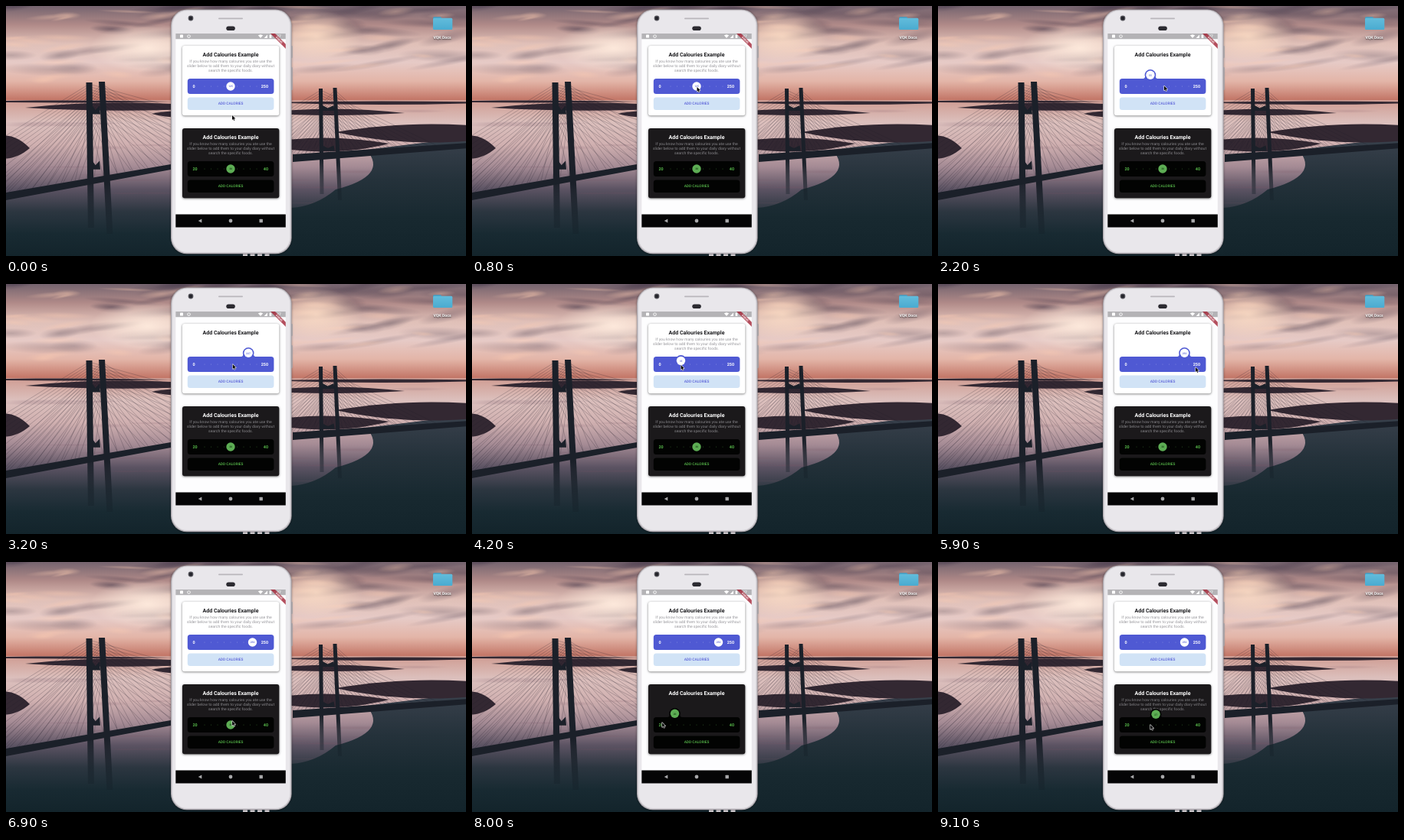
Write an HTML page with a canvas that moves like this. It is 600 px wide and 327 px high and loops after 9200 ms.

```html
<!DOCTYPE html>
<html lang="en">
<head>
<meta charset="utf-8">
<title>Fluid slider demo</title>
<style>
html, body { margin: 0; width: 100%; height: 100%; overflow: hidden; background: #1a2033; }
canvas { display: block; width: 600px; height: 327px; }
</style>
</head>
<body>
<canvas id="stage"></canvas>
<script>
const W = 600, H = 327, LOOP = 9200, STEP = 100, HORIZON = 123;
const ratio = window.devicePixelRatio || 1;

function setup(canvas) {
  canvas.width = W * ratio;
  canvas.height = H * ratio;
  const c = canvas.getContext('2d');
  c.scale(ratio, ratio);
  c.textRendering = 'geometricPrecision';
  return c;
}

const stage = setup(document.getElementById('stage'));
const backdrop = document.createElement('canvas');
let g = setup(backdrop);

// ---- helpers ----
const clamp = (v, lo, hi) => Math.min(hi, Math.max(lo, v));
const ease = u => (u = clamp(u, 0, 1), u * u * (3 - 2 * u));

let seed = 11;
function rnd(lo, hi) {
  seed = (seed * 16807) % 2147483647;
  return lo + (hi - lo) * seed / 2147483647;
}

function box(x, y, w, h, r, fill) {
  g.beginPath();
  g.roundRect(x, y, w, h, r);
  g.fillStyle = fill;
  g.fill();
}
function disc(x, y, r, fill) {
  g.beginPath();
  g.arc(x, y, r, 0, Math.PI * 2);
  g.fillStyle = fill;
  g.fill();
}
function poly(fill, ...p) {
  g.beginPath();
  for (let i = 0; i < p.length; i += 2) g.lineTo(p[i], p[i + 1]);
  g.closePath();
  g.fillStyle = fill;
  g.fill();
}
function text(s, x, y, size, fill, weight = 400, align = 'center') {
  g.font = `${weight} ${size}px Roboto, sans-serif`;
  g.textAlign = align;
  g.fillStyle = fill;
  g.fillText(s, x, y + size * 0.355);
}
function shade(y0, y1, ...stops) {
  const grad = g.createLinearGradient(0, y0, 0, y1);
  stops.forEach((s, i) => grad.addColorStop(i / (stops.length - 1), s));
  return grad;
}
function glow(x, y, rx, ry, rgb, alpha, tilt = 0) {
  g.save();
  g.translate(x, y);
  g.rotate(tilt);
  g.scale(rx, ry);
  const grad = g.createRadialGradient(0, 0, 0, 0, 0, 1);
  grad.addColorStop(0, `rgba(${rgb},${alpha})`);
  grad.addColorStop(0.5, `rgba(${rgb},${alpha * 0.55})`);
  grad.addColorStop(1, `rgba(${rgb},0)`);
  g.fillStyle = grad;
  g.fillRect(-1, -1, 2, 2);
  g.restore();
}
function withShadow(color, blur, dy, draw) {
  g.save();
  g.shadowColor = color;
  g.shadowBlur = blur * ratio;
  g.shadowOffsetY = dy * ratio;
  draw();
  g.restore();
}

// ---- wallpaper ----
function drawSky() {
  g.fillStyle = shade(0, HORIZON, '#75646f', '#b08a88', '#e0c0b8', '#e6cac6', '#e3b5a8', '#c27566');
  g.fillRect(0, 0, W, HORIZON);
  for (let i = 0; i < 55; i++) {
    const y = rnd(0, 1) ** 1.7 * 95;
    glow(rnd(0, W), y, rnd(25, 70), rnd(4, 9), '76,62,78', 0.42 - y * 0.0025, rnd(-0.25, 0.1));
  }
  for (let i = 0; i < 35; i++) glow(rnd(0, W), rnd(0, 100), rnd(15, 45), rnd(2, 6), '255,205,178', 0.35, rnd(-0.2, 0.1));
  glow(185, 55, 75, 32, '255,236,222', 0.9);
  glow(405, 40, 60, 34, '255,224,200', 0.8);
}

function drawWater() {
  g.fillStyle = shade(HORIZON, H, '#cf9c92', '#dcc0bd', '#d0b0b0', '#a48a94', '#5c5363', '#2c3640', '#182a32', '#13242b');
  g.fillRect(0, HORIZON, W, H - HORIZON);
  for (let i = 0; i < 40; i++) glow(rnd(0, W), rnd(130, 260), rnd(20, 60), rnd(1, 3), '120,84,100', 0.2);
  // shaded water on the right
  g.beginPath();
  g.moveTo(W, 172);
  g.lineTo(470, 188);
  g.quadraticCurveTo(500, 222, 430, 240);
  g.quadraticCurveTo(404, 262, 372, 264);
  g.lineTo(372, H);
  g.lineTo(W, H);
  g.fillStyle = shade(175, H, '#38404b', '#25323b', '#182930', '#13242b');
  g.fill();
}

function coast(x0, x1, y, up, down) {
  const third = (x1 - x0) / 3;
  g.beginPath();
  g.moveTo(x0, y);
  g.bezierCurveTo(x0 + third, y - up, x1 - third, y - up, x1, y);
  g.bezierCurveTo(x1 - third, y + down, x0 + third, y + down, x0, y);
  g.fillStyle = '#332832';
  g.fill();
}

function drawLand() {
  coast(-60, 215, 125, 2, 2);
  coast(25, 280, 133, 9, 5);
  coast(190, 260, 141, 5, 6);
  coast(-34, 31, 186, 22, 18);
  coast(340, 640, 126, 2, 4);
  coast(330, 520, 140, 7, 4);
  coast(430, 680, 165, 14, 18);
  coast(330, 500, 180, 10, 14);
}

const STEEL = '#1b2029';

function fan(x, top, reach, deck) {
  g.strokeStyle = 'rgba(34,30,42,.42)';
  g.lineWidth = 0.55;
  const n = 15;
  for (let i = 1; i <= n; i++) {
    const end = x + reach * i / n;
    g.beginPath();
    g.moveTo(x, top + (1 - i / n) * 50);
    g.lineTo(end, deck(end));
    g.stroke();
  }
}

function leg(x, top, foot, w, lean) {
  const fill = shade(top, foot, STEEL, STEEL, STEEL, 'rgba(20,32,40,.35)');
  poly(fill, x, top, x + w, top, x + w + lean, foot, x + lean, foot);
}

function bridge(x, top, foot, w, gap, reach, deck, from, to) {
  for (const side of [-1, 1]) {
    fan(x + w / 2, top + 2, side * reach, deck);
    fan(x + gap + w / 2, top + 2, side * reach * 0.55, deck);
  }
  poly(STEEL, from, deck(from), to, deck(to), to, deck(to) + 7, from, deck(from) + 10);
  leg(x, top, foot, w, w * 0.3);
  leg(x + gap, top - 1, foot + 8, w, w * 1.3);
  for (const k of [0.16, 0.54]) {
    const y = top + (foot - top) * k, dip = w * 0.7;
    poly(STEEL, x + w, y, x + w + gap / 2 - w / 2, y + dip, x + gap + 1, y, x + gap + 2, y + w * 1.4, x + w, y + w * 1.4);
  }
}

function drawBridges() {
  bridge(104.5, 100, 290, 8, 16.5, 275, x => 244 - 0.172 * x, 0, 215);
  bridge(408, 108, 246, 5, 18.5, 150, x => 194 - 0.065 * (x - 374), 374, W);
}

function drawFolder() {
  box(557, 14.3, 11, 5, 1.5, '#3f9fc6');
  box(557, 15.8, 25.3, 15.2, 1.5, shade(15, 31, '#63bddc', '#4aabd0'));
  withShadow('rgba(0,0,0,.7)', 1.5, 0.5, () => text('VQK Docs', 569, 41.3, 5.2, '#fff', 700));
}

// ---- phone ----
const SCREEN = { x: 221.3, y: 36, w: 143.5, h: 253.5 };

function drawPhone() {
  for (let i = 0; i < 4; i++) box(309 + i * 9.5, 323.5, 6, 4, 1, '#d8d4d8');
  box(371.5, 52, 2.3, 16, 1, '#b9b7bb');
  box(371.5, 80, 2.3, 30, 1, '#b9b7bb');
  withShadow('rgba(0,0,0,.4)', 3, 0.5, () => box(215, 4.5, 157.6, 319.8, 21, '#aaa5ab'));
  box(216, 5.2, 155.6, 318, 20.3, '#d3d0d5');
  box(217.3, 6.3, 153, 315.8, 19, '#e9e7eb');
  disc(241, 16, 3.4, '#55545b');
  disc(241, 16, 2.2, '#25252c');
  box(277, 15.4, 32, 1.8, 0.9, '#b9b6bb');
  box(287.3, 26.4, 11.5, 5.6, 2.8, '#2b2a30');
  const { x, y, w, h } = SCREEN;
  box(x, y, w, h, 0, '#fdfdfe');
  box(x, y, w, 7.2, 0, '#b4b3b6');
  box(x, 272.6, w, y + h - 272.6, 0, '#050506');
  drawStatus();
  const icon = '#a8a8aa';
  poly(icon, 250.7, 281, 255.3, 278.4, 255.3, 283.6);
  disc(293, 281, 2.4, icon);
  box(330.5, 278.8, 4.4, 4.4, 0.5, icon);
}

function drawStatus() {
  const ink = '#fff';
  box(227, 37.6, 4, 4, 0.6, ink);
  disc(238.5, 39.6, 2.2, ink);
  disc(238.5, 39.6, 1.4, '#b4b3b6');
  poly(ink, 328.8, 38.2, 332, 37.2, 335.2, 38.2, 332, 42);
  poly(ink, 336.6, 42, 341, 42, 341, 37.4);
  box(343.6, 37.4, 2.7, 4.6, 0.5, ink);
  text('5:27', 354, 39.7, 4.8, ink, 500);
  g.save();
  g.beginPath();
  g.rect(SCREEN.x, SCREEN.y, SCREEN.w, SCREEN.h);
  g.clip();
  g.translate(SCREEN.x + SCREEN.w, SCREEN.y);
  g.rotate(Math.PI / 4);
  box(-15, 9.8, 30, 4.2, 0, 'rgba(160,30,48,.78)');
  text('DEBUG', 0, 11.9, 3.5, '#fff', 700);
  g.restore();
}

// ---- slider cards ----
const light = {
  y: 52, card: '#ffffff', title: '#19191c', note: '#97969b', bar: '#4f59d3', dot: 'rgba(255,255,255,.32)',
  label: '#ffffff', knob: '#ffffff', value: '#4f59d3', button: '#d1e3f6', action: '#5a61d8', min: 0, max: 250
};
const dark = {
  y: 160, card: '#1b191b', title: '#ffffff', note: '#89888c', bar: '#020302', dot: 'rgba(92,180,80,.5)',
  label: '#58bb4b', knob: '#5dad54', value: '#123a10', button: '#020302', action: '#58bb4b', min: 20, max: 40
};
const NOTE = [
  'If you know how many calouries you ate use the',
  'slider below to add them to your daily diary without',
  'search the specific foods.'
];
const MID = 293, REACH = 28.5;

function drawCard(th, { x, lift, note }) {
  const y = th.y, top = y + 43;
  withShadow('rgba(0,0,0,.55)', 3, 0.8, () => box(230, y, 126.3, 91.2, 3, th.card));
  text('Add Calouries Example', MID, y + 11.2, 7, th.title, 700);
  g.globalAlpha = note;
  NOTE.forEach((s, i) => text(s, MID, y + 20.3 + i * 6, 5.07, th.note));
  g.globalAlpha = 1;

  box(236.8, top, 112.6, 20, 3.5, th.bar);
  for (let i = -4; i <= 4; i++) disc(MID + i * 8.5, top + 10, 0.5, th.dot);
  text(th.min, 243.5, top + 10.2, 5.4, th.label, 700, 'left');
  text(th.max, 342, top + 10.2, 5.4, th.label, 700, 'right');
  drawKnob(th, x, top, lift);

  box(236.8, y + 67.5, 112.6, 16.5, 3.5, th.button);
  text('ADD CALORIES', MID, y + 75.6, 4.8, th.action, 500);
}

function drawKnob(th, x, top, lift) {
  const cy = top + 10 - 14.7 * lift;
  if (lift > 0.2) {
    const half = 7.3 + 3.7 * lift;
    g.beginPath();
    g.moveTo(x - half, top + 0.5);
    g.quadraticCurveTo(x - 6.8, top, x - 6.9, cy + 2);
    g.lineTo(x + 6.9, cy + 2);
    g.quadraticCurveTo(x + 6.8, top, x + half, top + 0.5);
    g.fillStyle = th.bar;
    g.fill();
    disc(x, cy, 7.3, th.bar);
  }
  disc(x, cy, 5.7, th.knob);
  const value = th.min + (x - MID + REACH) / (2 * REACH) * (th.max - th.min);
  text(Math.round(value), x, cy + 0.1, 3.3, th.value, 500);
}

function drawCursor({ x, y }) {
  g.save();
  g.translate(x, y);
  g.scale(0.92, 0.92);
  g.lineJoin = 'round';
  g.lineWidth = 1.2;
  g.strokeStyle = '#f4f4f4';
  poly('#08080a', 0, 0, 0, 6.6, 1.5, 5.2, 2.5, 7.5, 3.5, 7.1, 2.5, 4.8, 4.6, 4.7);
  g.globalCompositeOperation = 'source-over';
  g.stroke();
  g.fill();
  g.restore();
}

// ---- motion ----
const RISE = 320, LAG = 280;
const hand = { x: 295, y: 143 };
const moves = [
  { from: 200, to: 800, x: 293.5, y: 106 },
  { from: 1050, to: 1600, x: 271, y: 105 },
  { from: 1700, to: 2700, x: 319, y: 104 },
  { from: 2800, to: 3600, x: 272.5, y: 106 },
  { from: 4600, to: 5400, x: 336, y: 109 },
  { from: 6250, to: 7000, x: 293, y: 213 },
  { from: 7200, to: 7650, x: 248, y: 210 },
  { from: 8050, to: 8400, x: 310, y: 212 },
  { from: 8400, to: 9000, x: 277, y: 213 }
];
const lightDrags = [{ press: 1000, release: 4000 }, { press: 4500, release: 6000 }];
const darkDrags = [{ press: 7100, release: 9050 }];

function pointer(t) {
  return moves.reduce((p, m) => {
    const k = ease((t - m.from) / (m.to - m.from));
    return { x: p.x + (m.x - p.x) * k, y: p.y + (m.y - p.y) * k };
  }, hand);
}

// The knob trails the pointer; the note hides while it is held.
function sliderState(drags, t) {
  const s = { x: MID, lift: 0, note: 1 };
  for (const { press, release } of drags) {
    if (t < press) break;
    const seen = clamp(t - LAG, press, release);
    s.x = clamp(pointer(seen).x, MID - REACH, MID + REACH);
    s.lift = ease((t - press) / RISE) - ease((t - release) / RISE);
    s.note = 1 - ease((t - press) / 200) + ease((t - release) / 60);
  }
  return s;
}

function render(t) {
  g.drawImage(backdrop, 0, 0, W, H);
  drawCard(light, sliderState(lightDrags, t));
  drawCard(dark, sliderState(darkDrags, t));
  drawCursor(pointer(t));
}

drawSky();
drawWater();
drawLand();
drawBridges();
drawFolder();
drawPhone();

g = stage;
const start = performance.now();
function tick() {
  const t = (performance.now() - start) % LOOP;
  render(Math.floor(t / STEP) * STEP);
  requestAnimationFrame(tick);
}
tick();
</script>
</body>
</html>
```
